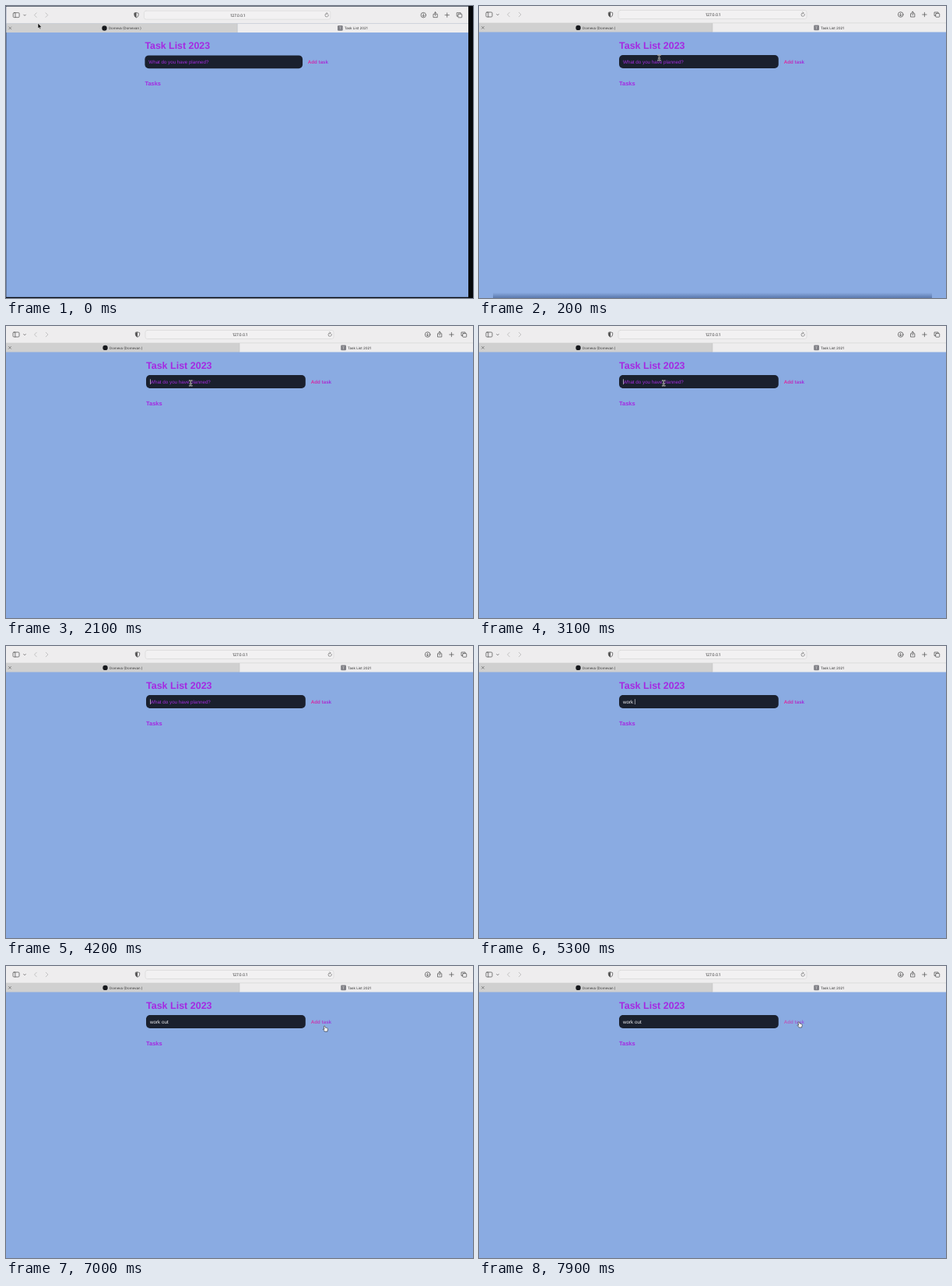
An HTML page that plays this animation: 600 px wide and 375 px high, repeating every 8000 ms.

```html
<!DOCTYPE html>
<html lang="en">
<head>
<meta charset="utf-8">
<title>Task List</title>
<style>
  html, body { margin: 0; width: 100%; height: 100%; overflow: hidden; background: #05070a; }
  svg { display: block; width: 600px; height: 375px; }
  text { text-rendering: geometricPrecision; }
  .app { font-family: "Liberation Sans", Arial, sans-serif; }
  .bold { font-weight: 700; fill: #a529e2; }
  .ui { font-family: Inter, Roboto, sans-serif; fill: #333; }
  .line { fill: none; stroke: #555; stroke-width: .75; stroke-linecap: round; stroke-linejoin: round; }
  .dim { stroke: #b4b4b4; }
</style>
</head>
<body>
<svg viewBox="0 0 600 375">
  <defs>
    <linearGradient id="pinkPurple" gradientUnits="userSpaceOnUse" x1="391" x2="418.500">
      <stop stop-color="#e02d98"/><stop offset="1" stop-color="#9430e4"/>
    </linearGradient>
    <linearGradient id="dock" x2="0" y2="1">
      <stop stop-color="#3a5688" stop-opacity="0"/><stop offset="1" stop-color="#3a5688" stop-opacity=".6"/>
    </linearGradient>
  </defs>

  <g id="win">
    <rect width="600" height="375" fill="#8aabe2"/>

    <!-- browser bars -->
    <rect width="600" height="22" fill="#eeedee"/>
    <rect y="22" width="300" height="11.500" fill="#d0d0d0"/>
    <rect x="300" y="22" width="300" height="11.500" fill="#eeedee"/>
    <path d="M0 21.800H600" stroke="#c9c9c9" stroke-width=".5"/>
    <path d="M300 22V33.500" stroke="#bdbdbd" stroke-width=".5"/>
    <g class="line">
      <rect x="9" y="8" width="8" height="6" rx="1.200"/>
      <path d="M11.800 8V14M22.700 10.500L24 11.800L25.300 10.500"/>
      <path class="dim" d="M39.300 8.200L36.500 11L39.300 13.800M51.200 8.200L54 11L51.200 13.800"/>
      <path d="M169 7.800L171.700 8.700V11Q171.500 13.300 169 14.300Q166.500 13.300 166.300 11V8.700Z"/>
      <path d="M169 7.800V14.300Q166.500 13.300 166.300 11V8.700Z" fill="#555" stroke="none"/>
      <rect x="179" y="5.500" width="242" height="11" rx="2.500" style="fill:#f2f1f2;stroke:#d6d6d6;stroke-width:.6"/>
      <path d="M418.200 10.200A2.200 2.200 0 1 1 416.500 8.900M416 7.700L417.200 8.900L416 10.100" style="stroke-width:.55"/>
      <circle cx="541.700" cy="11" r="3.300"/>
      <path d="M541.700 9.200V12.700M540.300 11.400L541.700 12.800L543.100 11.400"/>
      <path d="M556 9.800H554.500V14H559.800V9.800H558.300M557.150 11.800V7.200M555.700 8.600L557.150 7.200L558.600 8.600"/>
      <path d="M569.700 11H575.100M572.400 8.300V13.700"/>
      <path d="M586.500 12.500H585V8H590V9.500"/>
      <rect x="586.700" y="9.600" width="5" height="4.600" rx=".7"/>
      <path d="M3.500 26.300L6.500 29.300M6.500 26.300L3.500 29.300" style="stroke-width:.6"/>
    </g>
    <text class="ui" x="300.500" y="12.900" font-size="5" text-anchor="middle">127.0.0.1</text>
    <circle cx="127.500" cy="27.900" r="3.200" fill="#16181c"/>
    <text class="ui" x="133" y="29.500" font-size="4.400">Domeva (Domevan )</text>
    <rect x="430.200" y="24.500" width="6.800" height="6.800" rx="1.300" fill="#808086"/>
    <text class="ui" x="433.600" y="29.600" font-size="4.600" text-anchor="middle" style="fill:#eee">T</text>
    <text class="ui" x="439" y="29.500" font-size="4.500">Task List 2021</text>

    <!-- page -->
    <g class="app">
      <text class="bold" x="180" y="55" font-size="12.500">Task List 2023</text>
      <rect x="180" y="63" width="204.800" height="17" rx="5" fill="#1a202e"/>
      <text id="hint" x="185" y="73.800" font-size="6.250" fill="#a42de0">What do you have planned?</text>
      <text id="typed" x="185" y="73.800" font-size="6.250" fill="#f0f1f5"></text>
      <rect id="caret" y="68.200" width=".6" height="6.800" fill="#e8e8ee"/>
      <text id="add" x="391.700" y="73.800" font-size="6.250" font-weight="700" fill="url(#pinkPurple)">Add task</text>
      <text class="bold" x="180" y="102.200" font-size="7.500">Tasks</text>
    </g>
  </g>

  <rect id="shade" x="18" y="368" width="564" height="7" fill="url(#dock)"/>

  <g id="arrow">
    <path d="M0 0V7L1.600 5.600L2.700 8L3.800 7.500L2.800 5.200H4.900Z" fill="#111" stroke="#fff" stroke-width=".5"/>
  </g>
  <g id="beam" fill="none" stroke-linecap="round">
    <path d="M-1.700 -3.300Q0 -3.300 0 -2.300V2.400Q0 3.400 -1.700 3.400M1.700 -3.300Q0 -3.300 0 -2.300M0 2.400Q0 3.400 1.700 3.400M-1 1H1" stroke="#d2d0cc" stroke-width="1.400"/>
    <path d="M-1.500 -3.300Q0 -3.300 0 -2.300V2.400Q0 3.400 -1.500 3.400M1.500 -3.300Q0 -3.300 0 -2.300M0 2.400Q0 3.400 1.500 3.400M-.8 1H.8" stroke="#33343a" stroke-width=".5"/>
  </g>
  <g id="hand">
    <path d="M-1.800 -3.200Q-1 -3.900 -.5 -3L.2 -1.200Q.8 -1.700 1.300 -1Q1.900 -1.400 2.300 -.7Q3 -.8 3.100 0Q3.500 1.700 2.700 2.600V3.600H-.9Q-1.200 2.700 -2.800 1.300Q-3.200 .3 -2.200 .4L-1.200 1L-2 -2.400Z" fill="#fff" stroke="#222" stroke-width=".6" stroke-linejoin="round"/>
  </g>
</svg>

<script>
const LOOP = 8000, STEP = 100;
const $ = id => document.getElementById(id);
const show = (el, on) => el.setAttribute("visibility", on ? "visible" : "hidden");

// time, x, y, pointer kind
const path = [
  [0, 41, 22, "arrow"], [100, 150, 43, "arrow"],
  [200, 231.5, 66.3, "beam"], [300, 235, 69.5, "beam"], [600, 237, 72, "beam"],
  [900, 237, 72, "beam"], [1300, 233, 69.5, "beam"], [1700, 235.5, 72, "beam"],
  [2100, 237.3, 73.3, "beam"], [4000, 237.3, 73.3, "beam"], [4100, 237.3, 73.3, ""],
  [6500, 262, 72, "beam"], [6600, 318, 69, "beam"], [6700, 368, 66, "beam"],
  [6800, 368, 66, "beam"], [6900, 402, 80.5, "hand"], [7000, 410.3, 80.5, "hand"],
  [7300, 416, 77.5, "hand"], [7700, 412, 75.3, "hand"]
];
const typing = [[0, ""], [4300, "w"], [4500, "wo"], [4900, "wor"], [5100, "work"],
  [5300, "work "], [5600, "work o"], [5800, "work ou"], [6000, "work out"]];
const blink = [[0, 0], [2100, 1], [2600, 0], [3100, 1], [3600, 0], [4100, 1], [6500, 0]];
const press = [[0, 1], [6900, .85], [7800, .6]];
const zoom = [[0, 1], [100, .4], [200, 0]];
const dock = [[0, 0], [100, .5], [200, 1], [300, .75], [400, .5], [500, .25], [600, 0]];

const indexAt = (table, t) => table.findLastIndex(row => row[0] <= t);
const valueAt = (table, t) => table[indexAt(table, t)][1];

function drawPointer(t) {
  const i = indexAt(path, t), [t0, x0, y0, kind] = path[i];
  const [t1, x1, y1] = path[i + 1] || [LOOP, x0, y0];
  const k = (t - t0) / (t1 - t0);
  for (const name of ["arrow", "beam", "hand"]) show($(name), name === kind);
  if (kind) $(kind).setAttribute("transform", `translate(${x0 + (x1 - x0) * k} ${y0 + (y1 - y0) * k})`);
}

function draw(now) {
  const t = Math.floor((now % LOOP) / STEP) * STEP;
  const z = valueAt(zoom, t);
  $("win").setAttribute("transform", `translate(${.3 * z} ${.7 * z}) scale(${1 - .0105 * z} ${1 - .005 * z})`);
  $("shade").setAttribute("opacity", valueAt(dock, t));

  const text = valueAt(typing, t).replace(/ /g, "\u00a0");
  const typed = $("typed");
  if (typed.textContent !== text) typed.textContent = text;
  show($("hint"), !text);
  $("caret").setAttribute("x", 185 + (text ? typed.getComputedTextLength() : 0));
  show($("caret"), valueAt(blink, t));
  $("add").setAttribute("opacity", valueAt(press, t));
  drawPointer(t);
}

function tick() {
  draw(performance.now());
  requestAnimationFrame(tick);
}
tick();
</script>
</body>
</html>
```
